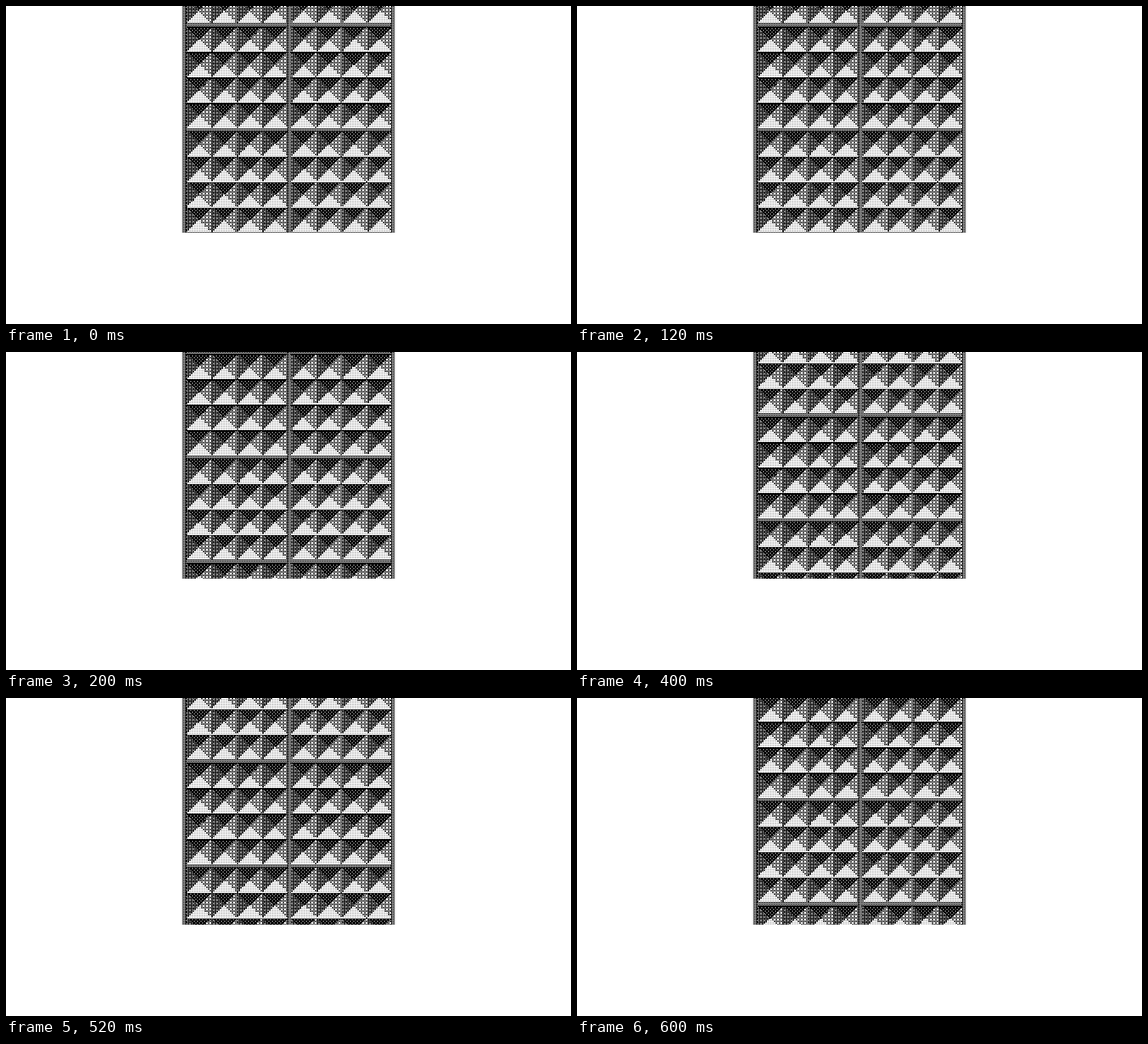
An HTML page with a canvas that plays this animation: 998x561 px, repeating every 700 ms.

```html
<!DOCTYPE html>
<html>
<head>
<meta charset="utf-8">
<style>
html, body { margin: 0; width: 100%; height: 100%; overflow: hidden; background: #fff; }
canvas { position: absolute; left: 311px; top: 0; }
</style>
</head>
<body>
<canvas id="weave" width="376" height="400"></canvas>
<script>
const BLOCK = 123, CELL = 29.8, INSET = 0.8;
const OFFSETS = [23, 1, 75, 120], STEP = 200, LOOP = 700;
const BAYER = [0, 8, 2, 10, 12, 4, 14, 6, 3, 11, 1, 9, 15, 7, 13, 5];
const TONE = { top: 2, left: 5, right: 9, bottom: 12, border: 8 };

const canvas = document.getElementById('weave');
const W = canvas.width, H = canvas.height;
const ctx = canvas.getContext('2d');
const image = ctx.createImageData(W, H);
const pixels = new Uint32Array(image.data.buffer);
const mod = (a, n) => ((a % n) + n) % n;

// Brightness out of 16 inside a block of four by four pyramids
function tone(x, y, offset) {
  if (x === 4 || x === 124 || x === 246) return 0;
  if (x < 4 || x > 246) return TONE.border;
  const u = (mod(x - 4, BLOCK) - INSET) / CELL;
  const v = (mod(y - offset, BLOCK) - INSET) / CELL;
  if (u < 0 || u >= 4 || v < 0 || v >= 4) return TONE.border;
  const a = u % 1, b = v % 1;
  if (b * CELL < 1) return 0;
  if (a + b < 1) return b < a ? TONE.top : TONE.left;
  return b < a ? TONE.right : TONE.bottom;
}

// Each stitch is one and a half pixels, so widths alternate 1, 2 and heights 2, 1
function draw(offset) {
  for (let py = 0; py < H; py++) {
    const y = Math.floor(py * 2 / 3);
    for (let px = 0; px < W; px++) {
      const x = Math.floor((px * 2 + 1) / 3);
      const lit = BAYER[(y % 4) * 4 + x % 4] < tone(x, y, offset);
      pixels[py * W + px] = lit ? 0xffffffff : 0xff000000;
    }
  }
  ctx.putImageData(image, 0, 0);
}

let shown = -1;
function tick() {
  const step = Math.floor((performance.now() % LOOP) / STEP);
  if (step !== shown) draw(OFFSETS[shown = step]);
  requestAnimationFrame(tick);
}
tick();
</script>
</body>
</html>
```
